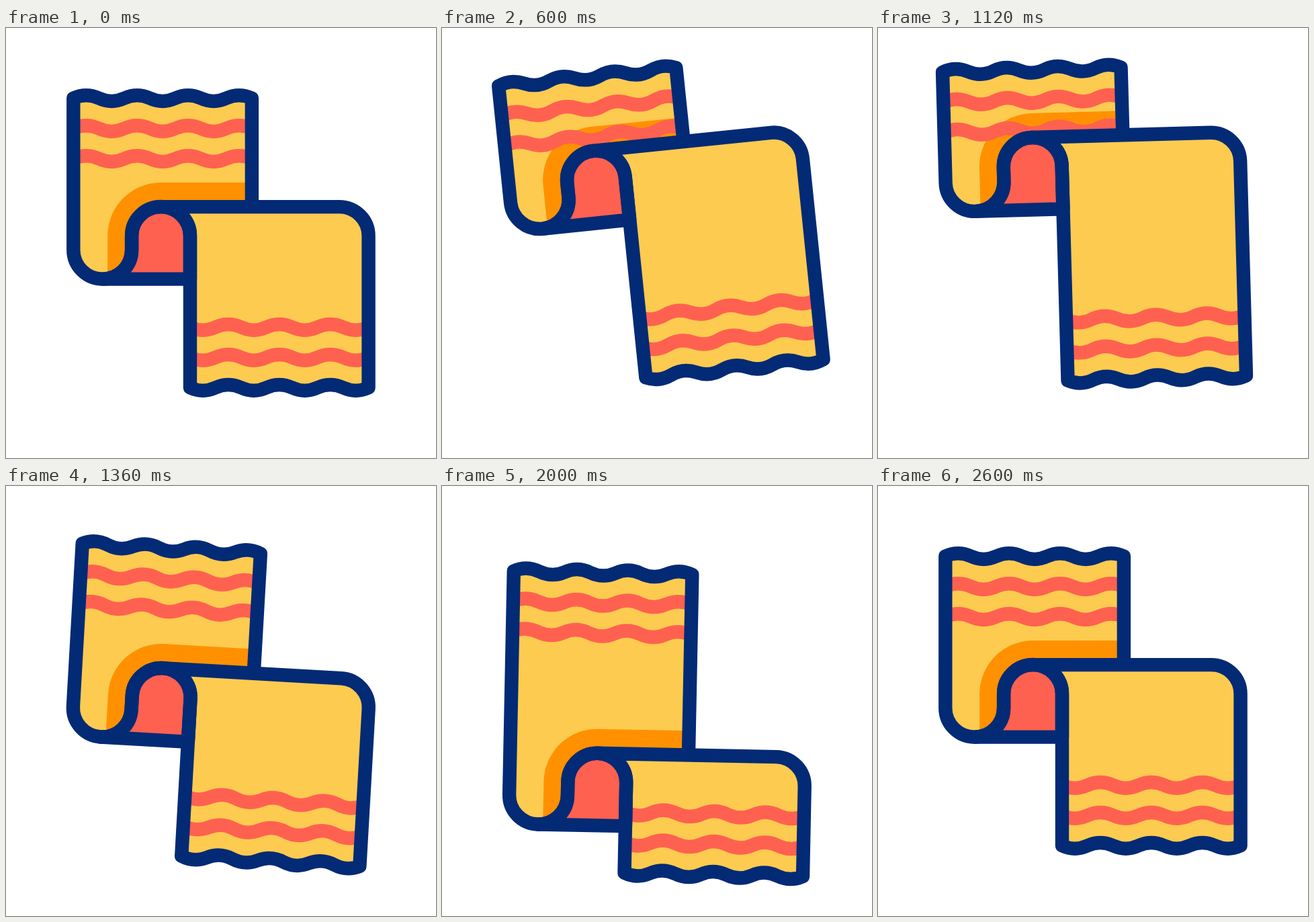
Write an HTML page with a canvas that moves like this. It is 640x640 px and loops after 3 s.

```html
<!DOCTYPE html>
<html lang="en">
<head>
<meta charset="utf-8">
<title>Towel</title>
<style>
  html, body { margin: 0; width: 100%; height: 100%; overflow: hidden; background: #fff; }
  canvas { display: block; }
</style>
</head>
<body>
<canvas width="640" height="640"></canvas>
<script>
const ctx = document.querySelector('canvas').getContext('2d');
const LOOP = 3000, LINE = 20.4;
const NAVY = '#032a75', YELLOW = '#fdcb50', RED = '#ff6150', ORANGE = '#ff9100';

// Each track is a list of [time in ms, value]
const slideTrack = (high, low) => [[200, 0], [894, high], [1838, low], [2600, 0]];
const tilt = [[200, 0], [695, -6.13], [1588, 4.13], [2280, 0]];
const lift = slideTrack(-122.5, 139.5);
const backSlide = slideTrack(74.7, -113.5);
const frontSlide = slideTrack(109, -97.5);

// cubic-bezier(0.6, 0, 0.4, 1)
function ease(x) {
  let low = 0, high = 1;
  for (let i = 0; i < 24; i++) {
    const s = (low + high) / 2;
    if (1.8 * s - 2.4 * s * s + 1.6 * s ** 3 < x) low = s;
    else high = s;
  }
  return low * low * (3 - 2 * low);
}

function valueAt(track, time) {
  for (let i = 1; i < track.length; i++) {
    const [t0, a] = track[i - 1], [t1, b] = track[i];
    if (time < t1) return a + (b - a) * ease(Math.max(0, (time - t0) / (t1 - t0)));
  }
  return track[track.length - 1][1];
}

const wave = bend => `q18.97 ${bend} 37.94 0` + 't37.94 0'.repeat(6);

function fill(path, color) {
  ctx.fillStyle = color;
  ctx.fill(new Path2D(path));
}

function stroke(path, color) {
  ctx.strokeStyle = color;
  ctx.stroke(new Path2D(path));
}

function stripes(x, y, step, bend) {
  for (const k of [1, 2]) stroke(`M${x} ${y + k * step}` + wave(bend), RED);
}

function draw(time) {
  const top = 104.6 + valueAt(backSlide, time);
  const bottom = 535.3 + valueAt(frontSlide, time);
  const curl = 'A43.4 43.4 0 0';
  const back = `M230.6 266.1${curl} 0 187.1 309.5V330.2${curl} 1 143.7 373.6` +
    `${curl} 1 100.3 330.2V${top}${wave(-8.7)}V266.1`;
  const front = `M230.6 266.1${curl} 1 274 309.5V${bottom}${wave(8.7)}V309.5` +
    `${curl} 0 496.2 266.1Z`;
  const inside = `M143.7 373.6${curl} 0 187.1 330.2V309.5${curl} 1 274 309.5V373.6Z`;
  const shadow = 'M366 230H230.6A79.4 79.4 0 0 0 151.2 309.5V370H274V266H366Z';

  ctx.setTransform(1, 0, 0, 1, 0, 0);
  ctx.fillStyle = '#fff';
  ctx.fillRect(0, 0, 640, 640);
  ctx.translate(233, 320 + valueAt(lift, time));
  ctx.rotate(valueAt(tilt, time) * Math.PI / 180);
  ctx.translate(-233, -320);
  ctx.lineWidth = LINE;
  ctx.lineJoin = 'round';

  fill(back, YELLOW);
  fill(shadow, ORANGE);
  stripes(100.3, top, 45, -8.7);
  fill(inside, RED);
  fill(front, YELLOW);
  stripes(274, bottom, -45, 8.7);
  for (const path of [back, inside, front]) stroke(path, NAVY);
}

function tick() {
  draw(performance.now() % LOOP);
  requestAnimationFrame(tick);
}
tick();
</script>
</body>
</html>
```
